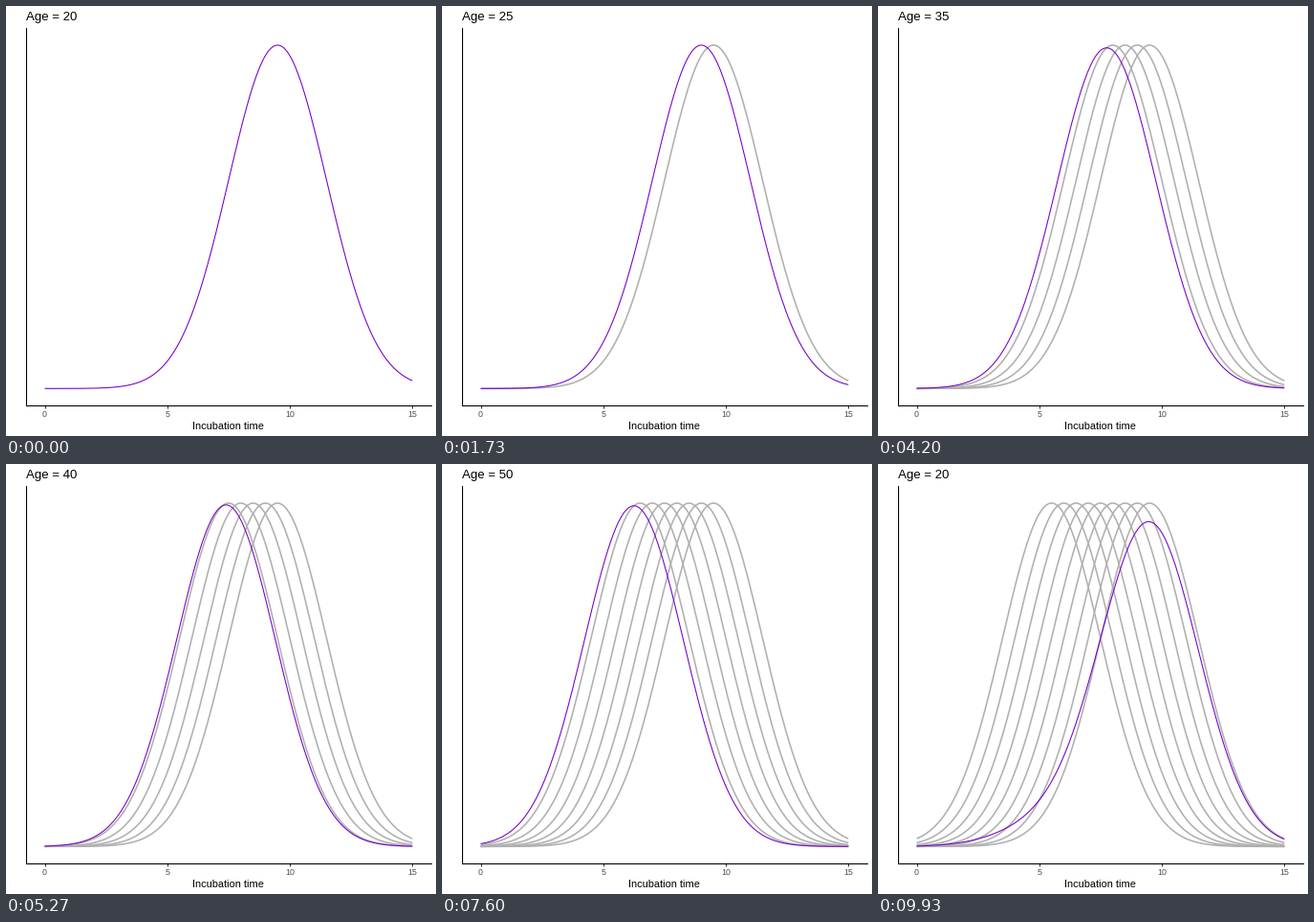
A matplotlib script that plays this animation: 450x450 px, repeating every 10000 ms.

```python
import numpy as np
import matplotlib.pyplot as plt
from matplotlib.animation import FuncAnimation

plt.rcParams["font.family"] = "Liberation Sans"

SIZE, DPI = 450, 72                      # one point equals one pixel
LEFT, RIGHT, TOP, BOTTOM = 21.3, 444.5, 23.0, 418.3
FRAMES, LOOP = 150, 10000
STEPS = 8                                # frames per transition
STARTS = [9, 26, 43, 60, 77, 94, 111, 127, 143]
AGES = list(range(20, 61, 5))
PURPLE, GREY = "#7800c8", "#b0b0b0"

x = np.linspace(0, 15, 400)
curves = [np.exp(-(x - (11.5 - age / 10)) ** 2 / 8) for age in AGES]

fig = plt.figure(figsize=(SIZE / DPI, SIZE / DPI), dpi=DPI, facecolor="white")
ax = fig.add_axes([LEFT / SIZE, 1 - BOTTOM / SIZE,
                   (RIGHT - LEFT) / SIZE, (BOTTOM - TOP) / SIZE])
pad = 0.05
ax.set_xlim(-15 * pad, 15 * (1 + pad))
ax.set_ylim(-pad, 1 + pad)
ax.spines[["top", "right"]].set_visible(False)
ax.spines[["left", "bottom"]].set_linewidth(1.07)
ax.set_xticks([0, 5, 10, 15], labels=[])
ax.set_yticks([])
ax.tick_params(axis="x", length=2.75, width=1.07, color="#333333")


def label(px, py, text, size, color="black", ha="center"):
    return fig.text(px / SIZE, 1 - py / SIZE, text, fontsize=size,
                    color=color, ha=ha, va="baseline")


def curve(y, color, width, z):
    return ax.plot(x, y, color=color, lw=width, zorder=z,
                   solid_capstyle="butt")[0]


for tick in (0, 5, 10, 15):
    label(40.5 + tick * 25.65, 430, str(tick), 8.8, "#4d4d4d")
label((LEFT + RIGHT) / 2, 443, "Incubation time", 11)
title = label(21, 15, "", 13.2, ha="left")

shadows = [curve(y, GREY, 1.6, 2) for y in curves]
current = curve(curves[0], PURPLE, 1.07, 3)


def cubic_in_out(t):
    return 4 * t ** 3 if t < 0.5 else 1 - 4 * (1 - t) ** 3


def draw(frame):
    passed = sum(frame >= s for s in STARTS)
    state, t = 0, 0.0
    if passed:
        state = passed - 1
        t = min((frame - STARTS[state] + 1) / STEPS, 1)
    following = (state + 1) % len(AGES)
    k = cubic_in_out(t)
    current.set_ydata((1 - k) * curves[state] + k * curves[following])
    title.set_text(f"Age = {AGES[following if t > 0.5 else state]}")
    for i, line in enumerate(shadows):
        line.set_visible(i < passed)
    return [current, title, *shadows]


anim = FuncAnimation(fig, draw, frames=FRAMES, interval=LOOP / FRAMES,
                     repeat=True, repeat_delay=0, blit=False)
plt.show()
```
